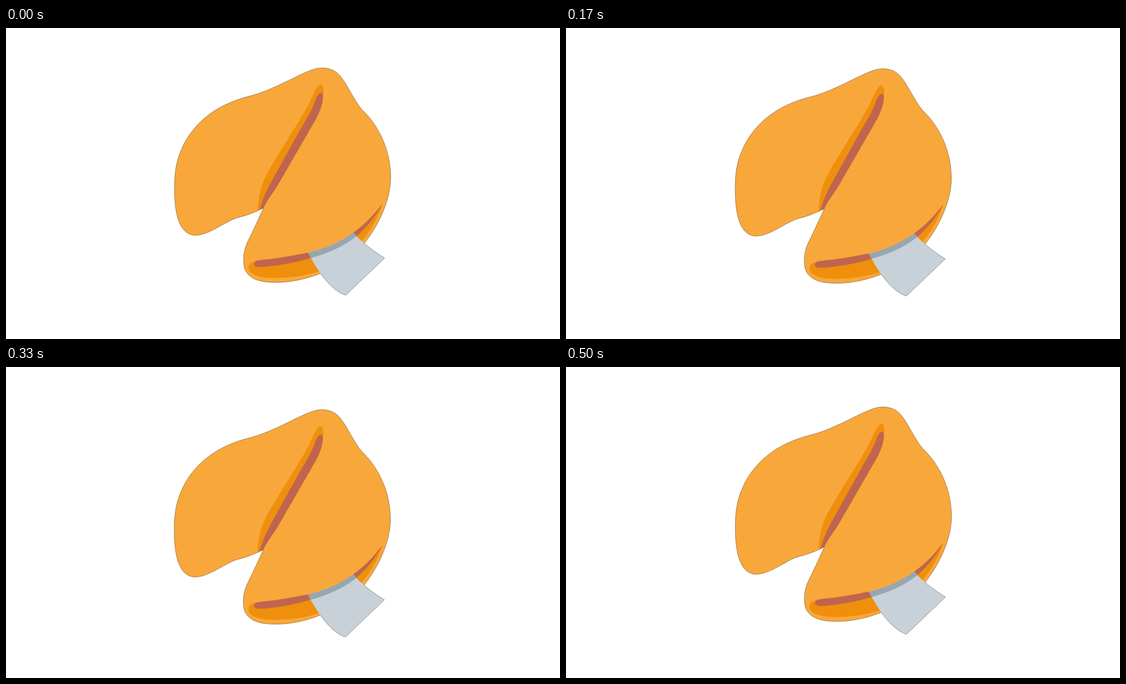
An HTML page with a canvas that plays this animation: 998x561 px, repeating every 540 ms.

```html
<!DOCTYPE html>
<html lang="en">
<head>
<meta charset="utf-8">
<title>Fortune cookie</title>
<style>
html, body { margin: 0; width: 100%; height: 100%; overflow: hidden; background: #fff; }
canvas { display: block; width: 100vw; height: 100vh; }
</style>
</head>
<body>
<canvas id="stage" width="998" height="561"></canvas>
<script>
const ctx = document.getElementById('stage').getContext('2d');
const LOOP = 540;
const STEPS = [0, 40, 80, 130, 170, 210, 250, 290, 330, 380, 420, 460, 500];

// Shake keys: time, dx, dy
const SHAKE = [[0, 0, 0], [80, 1.5, 6], [130, 2, 5], [210, 0.5, -1],
               [330, -0.4, 5], [420, 1, 2.5], [500, 1.5, 0]];

const COLORS = {
  cookie: '#f8a73b', inner: '#ef8f0b', fold: '#bf654f',
  paper: '#c8d1d8', shade: '#97a6af', line: 'rgba(35,25,10,.42)'
};

const cookie = new Path2D(`M303.5 290 C303.5 262 306 242 316 219
  C336 172 378 138 438 123 C475 114 512 92 542 79 C552 75 560 72 569 72
  C585 72 596 78 604 89 C616 104 625 127 641 147 C673 177 693 222 693 270
  C693 297 683 324 675 341 C667 358 657 374 645 389
  C625 415 590 437 566 443 C540 453 514 459 485 459
  C466 459 446 456 436 444 C429 437 428 428 428 417
  C428 400 434 388 438 380 C446 364 454 346 464 324.5
  C450 332 434 338 418 342 C394 349 368 373 341 374
  C315 373 303.5 343 303.5 290 Z`);

const creaseInner = new Path2D(`M453.5 329 C455 298 462 275 478 249
  C502 209 525 174 545 138 C553 122 560 102 567 102
  C572 103 573 113 571 124 L462 325.5 Z`);

const creaseFold = new Path2D(`M457 327.5 C463 305 474 284 487 261
  L532 180 C541 165 550 150 556 134 C560 121 565 116 569 117
  C574 120 571 142 558 165 L490 283 C481 298 472 308 464 324.5 Z`);

const opening = new Path2D(`M437 432 C437 425 443 421 455 419
  C485 416 515 411 545 405 C575 398 602 386 626 369
  C648 353 663 337 678 317 C672 340 656 367 640 385
  C622 409 595 429 566 438.5 C540 447 510 451 484 451
  C460 451 437 446 437 432 Z`);

const openingFold = new Path2D(`M447 425 C448 420 455 419 463 418
  C488 416 515 411 545 405 C575 398 602 386 626 369
  C648 353 663 337 678 317 C665 341 651 358 631 376
  C608 394 581 406 549 415 C517 424 487 430 458 431
  C450 431 446 429 447 425 Z`);

const paper = new Path2D(`M544 405 C575 398 602 386 626 369
  C640 386 660 401 682 415 L612 482 C586 474 562 440 544 405 Z`);

const wholeStage = new Path2D('M0 0 H998 V561 H0 Z');
const outsideCookie = new Path2D(wholeStage);
outsideCookie.addPath(cookie);
const outsidePaper = new Path2D(wholeStage);
outsidePaper.addPath(paper);

function fill(path, color) {
  ctx.fillStyle = color;
  ctx.fill(path);
}

function clipped(area, draw, rule = 'nonzero') {
  ctx.save();
  ctx.clip(area, rule);
  draw();
  ctx.restore();
}

function outline(path, outside) {
  clipped(outside, () => {
    ctx.strokeStyle = COLORS.line;
    ctx.lineWidth = 1;
    ctx.stroke(path);
  }, 'evenodd');
}

// Smooth curve through the shake keys
function shakeAt(t) {
  let i = 0;
  while (i < SHAKE.length - 2 && t >= SHAKE[i + 1][0]) i++;
  const a = SHAKE[i], b = SHAKE[i + 1];
  const before = SHAKE[Math.max(i - 1, 0)];
  const after = SHAKE[Math.min(i + 2, SHAKE.length - 1)];
  const span = b[0] - a[0], u = (t - a[0]) / span;
  return [1, 2].map(k => {
    const m0 = (b[k] - before[k]) / (b[0] - before[0]) * span;
    const m1 = (after[k] - a[k]) / (after[0] - a[0]) * span;
    return a[k] * (1 + 2 * u) * (1 - u) ** 2 + m0 * u * (1 - u) ** 2
         + b[k] * u * u * (3 - 2 * u) + m1 * u * u * (u - 1);
  });
}

function render(now) {
  const t = now % LOOP;
  const [dx, dy] = shakeAt(STEPS.filter(s => s <= t).pop());
  ctx.setTransform(1, 0, 0, 1, 0, 0);
  fill(wholeStage, '#fff');
  ctx.translate(dx, dy);

  fill(cookie, COLORS.cookie);
  clipped(cookie, () => {
    fill(creaseInner, COLORS.inner);
    fill(creaseFold, COLORS.fold);
  });
  fill(opening, COLORS.inner);
  fill(openingFold, COLORS.fold);
  fill(paper, COLORS.paper);
  clipped(paper, () => fill(openingFold, COLORS.shade));
  outline(cookie, outsidePaper);
  outline(paper, outsideCookie);
}

const start = performance.now();
function tick() {
  render(performance.now() - start);
  requestAnimationFrame(tick);
}
tick();
</script>
</body>
</html>
```
